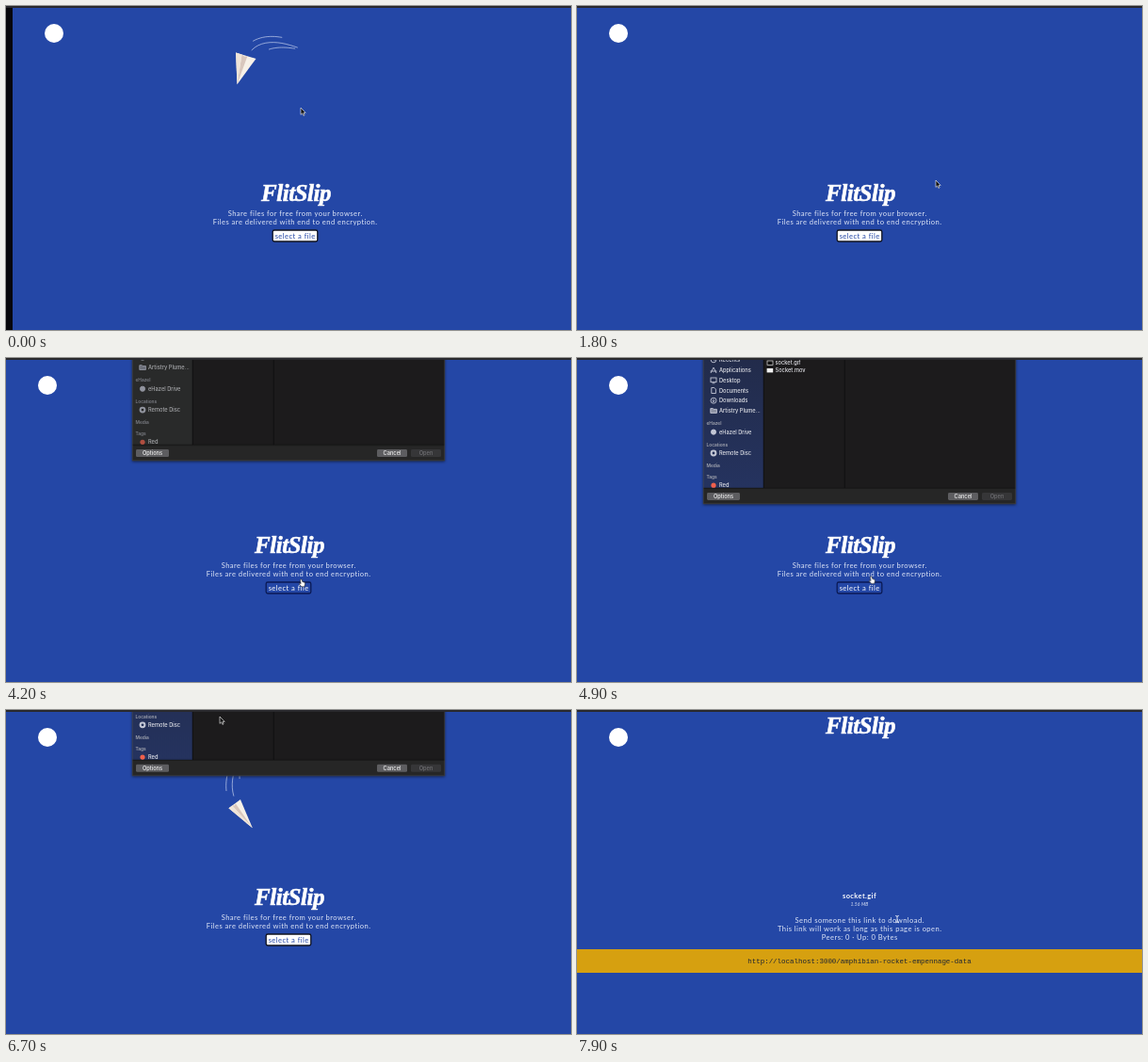
Recreate the animation shown at these times as an HTML page. Size 600 by 344 pixels, loop 8000 ms.

```html
<!DOCTYPE html>
<html lang="en">
<head>
<meta charset="utf-8">
<title>File sharing demo</title>
<style>
  html, body { margin: 0; width: 100%; height: 100%; overflow: hidden; background: #07070b; }
  svg { display: block; width: 600px; height: 344px; }
  text { white-space: pre; }
  .mid { text-anchor: middle; }
  .copy { font: 7.6px Lato, sans-serif; letter-spacing: .44px; fill: #dfe6f7; }
  .brand { font: italic bold 25px "Liberation Serif", serif; letter-spacing: -.5px;
           fill: #fff; stroke: #fff; stroke-width: .6; }
  .link { font: 7.48px "Liberation Mono", monospace; fill: #1d2433; }
  .ui { font: 500 5.7px Inter, sans-serif; fill: #e4e5ea; }
  .head { font: 600 4.8px Inter, sans-serif; fill: #a3a6b0; }
  .icon { fill: none; stroke: #c3c7d6; stroke-width: .9; }
  .trail { fill: none; stroke: #dfe6f8; stroke-width: .6; stroke-linecap: round; }

  #page, .title, .home, .share, .face, .label, #dialog, .tint, #sidebar, #cursor, .arrow, .hand, .beam {
    animation: 8s linear infinite;
  }
  #page { animation-name: settle; }
  @keyframes settle {
    0%, 1.25% { transform: translateX(7px); animation-timing-function: ease-out; }
    4%, 100% { transform: none; }
  }

  .title, .home, .share, .face, .label, .arrow, .hand, .beam { animation-timing-function: step-end; }
  .title { animation-name: lift; }
  .home { animation-name: leave; }
  .share { animation-name: arrive; }
  @keyframes lift { 0% { transform: none; } 92.5%, 100% { transform: translateY(-182px); } }
  @keyframes leave { 0% { opacity: 1; } 92.5%, 100% { opacity: 0; } }
  @keyframes arrive { 0% { opacity: 0; } 92.5%, 100% { opacity: 1; } }

  .face { fill: #fff; stroke: #10131f; stroke-width: 1.3; animation-name: face; }
  .label { fill: #2447a6; animation-name: label; }
  @keyframes face {
    0%, 62.5%, 100% { fill: #fff; stroke: #10131f; }
    35% { fill: #2447a6; stroke: #0b1a55; }
  }
  @keyframes label { 0%, 62.5%, 100% { fill: #2447a6; } 35% { fill: #fff; } }

  #dialog { animation-name: sheet; }
  @keyframes sheet {
    0%, 50% { transform: translateY(-165px); animation-timing-function: cubic-bezier(.33, 1, .68, 1); }
    57.2%, 81.25% { transform: none; animation-timing-function: ease-in; }
    85%, 100% { transform: translateY(-165px); }
  }
  .tint { animation-name: tint; }
  @keyframes tint { 0%, 57.5% { opacity: 0; } 60%, 100% { opacity: 1; } }
  #sidebar { animation-name: wake; }
  @keyframes wake { 0%, 57.5% { opacity: .68; } 60%, 100% { opacity: 1; } }

  #cursor { animation-name: point; }
  @keyframes point {
    0%, 1.25% { transform: translate(313px, 108px); }
    12.5% { transform: translate(318px, 124px); }
    18% { transform: translate(372px, 176px); }
    22.5%, 24% { transform: translate(381px, 185px); animation-timing-function: ease-in-out; }
    33.75% { transform: translate(326px, 221px); }
    37%, 42% { transform: translate(313px, 246px); animation-timing-function: ease-in-out; }
    48%, 60% { transform: translate(312px, 235px); animation-timing-function: ease-in-out; }
    75%, 91% { transform: translate(227px, 7px); animation-timing-function: ease-in-out; }
    98%, 100% { transform: translate(340px, 222px); }
  }
  .arrow { animation-name: arrow; }
  .hand { animation-name: hand; }
  .beam { animation-name: beam; }
  @keyframes arrow { 0%, 62.5% { opacity: 1; } 35%, 96%, 100% { opacity: 0; } }
  @keyframes hand { 0%, 62.5%, 100% { opacity: 0; } 35% { opacity: 1; } }
  @keyframes beam { 0% { opacity: 0; } 96%, 100% { opacity: 1; } }
</style>
</head>
<body>
<svg viewBox="0 0 600 344">
  <defs>
    <linearGradient id="side" x2="0" y2="1">
      <stop offset="0" stop-color="#222b49"/>
      <stop offset="1" stop-color="#25335f"/>
    </linearGradient>
    <filter id="shadow" x="-5%" y="-5%" width="110%" height="115%">
      <feDropShadow dx="0" dy="1" stdDeviation="1.5" flood-color="#000" flood-opacity=".55"/>
    </filter>
  </defs>

  <g id="page">
    <rect width="600" height="344" fill="#2447a6"/>
    <circle cx="44" cy="29" r="10" fill="#fff"/>

    <path id="route" fill="none" d="M400 150 C385 90 330 57 294 44 C275 37 255 38 248 56
      C234 84 241 103 265 127 C295 157 350 165 410 140"/>
    <g id="flight">
      <path class="trail"/><path class="trail"/><path class="trail"/>
      <g id="plane">
        <path d="M16 0 L-16 -10 L-16 10Z" fill="#f7f1e8"/>
        <path d="M16 0 L-16 -1.5 L-14.5 1 L-16 4Z" fill="#d9c7bd"/>
        <path d="M16 0 L-16 4 L-16 10Z" fill="#efe4d8"/>
      </g>
    </g>

    <text class="brand title mid" x="301" y="207">FlitSlip</text>

    <g class="home">
      <text class="copy mid" x="300.2" y="222.5">Share files for free from your browser.</text>
      <text class="copy mid" x="300.2" y="231.7">Files are delivered with end to end encryption.</text>
      <rect class="face" x="276.2" y="238" width="47.6" height="12" rx="1.8"/>
      <text class="copy label mid" x="300.2" y="246.6">select a file</text>
    </g>

    <g class="share">
      <text class="copy mid" x="300" y="200.4" style="font-weight:bold;font-size:7.4px;fill:#fff">socket.gif</text>
      <text class="copy mid" x="300" y="207.6" style="font-style:italic;font-size:5px;letter-spacing:.1px">1.56 MB</text>
      <text class="copy mid" x="300.2" y="225.5">Send someone this link to download.</text>
      <text class="copy mid" x="300.2" y="234.7">This link will work as long as this page is open.</text>
      <text class="copy mid" x="300.2" y="243.8">Peers: 0 · Up: 0 Bytes</text>
      <rect y="254" width="600" height="25" fill="#d6a010"/>
      <text class="link mid" x="300" y="269.2">http://localhost:3000/amphibian-rocket-empennage-data</text>
    </g>
  </g>

  <g id="dialog">
    <rect x="134" y="-10" width="332" height="165" fill="#262627" filter="url(#shadow)"/>
    <rect x="134" y="-10" width="64" height="148" fill="#292a2a"/>
    <rect class="tint" x="134" y="-10" width="64" height="148" fill="url(#side)"/>
    <rect x="198" y="-10" width="268" height="148" fill="#1c1b1c"/>
    <path d="M198.2 -10V138M284.2 -10V138" stroke="#0d0d0e" stroke-width=".8"/>
    <path d="M134 138.2H466" stroke="#111" stroke-width=".7"/>
    <path d="M134.2 -10V154.8H465.8V-10" fill="none" stroke="#4b4c50" stroke-width=".6"/>
    <g id="sidebar"></g>
    <rect x="202" y="3" width="6" height="4.6" fill="#111" stroke="#ddd" stroke-width=".7"/>
    <text class="ui" x="210.5" y="7.4">socket.gif</text>
    <rect x="201.6" y="11" width="6.6" height="4.4" fill="#f3f3f3"/>
    <text class="ui" x="210.5" y="15.3">Socket.mov</text>
    <g id="buttons"></g>
  </g>

  <rect width="600" height="2" fill="#29292d"/>

  <g id="cursor">
    <path class="arrow" d="M0 0V7.4L1.7 5.9L2.9 8.4L4.1 7.8L3 5.4H5.2Z" fill="#111" stroke="#fff" stroke-width=".6"/>
    <path class="hand" d="M1 0Q2 -.4 2.3 .8L2.8 2.6L5 3.2Q5.8 3.6 5.6 5L4.8 7.8H1.8L-.6 4.9Q-.7 3.7 1.2 4.4L.4 1Q.3 .2 1 0Z"
      fill="#fff" stroke="#222" stroke-width=".6"/>
    <path class="beam" d="M-1.8 -3.6Q0 -3.6 0 -2.4Q0 -3.6 1.8 -3.6M0 -2.8V3M-1.8 3.8Q0 3.8 0 2.6Q0 3.8 1.8 3.8"
      fill="none" stroke="#fff" stroke-width=".8"/>
  </g>
</svg>
<script>
const start = performance.now();
const $ = id => document.getElementById(id);

// Sidebar: icons are drawn around (145, 0)
const icons = {
  clock: '<circle cx="145" r="2.8"/><path d="M145 -1.8V0H146.8"/>',
  apps: '<path d="M142 3L145 -3L148 3M141.6 1H148.4"/>',
  desk: '<rect x="142" y="-2.6" width="6" height="4.6"/><path d="M143.5 3.2H146.5"/>',
  doc: '<path d="M142.8 -3H145.8L147.4 -1.4V3H142.8Z"/>',
  down: '<circle cx="145" r="3"/><path d="M145 -1.6V1.4M143.7 .2L145 1.5L146.3 .2"/>',
  folder: '<path d="M141.8 -2.4H144.4L145 -1.6H148.4V2.4H141.8Z" fill="#8d92a3"/>',
  dot: '<circle cx="145" r="2.6" fill="#c3c7d6"/>',
  disc: '<circle cx="145" r="2.4" stroke-width="2"/>',
  red: '<circle cx="145" r="2.6" fill="#f0604c" stroke="none"/>'
};
const rows = [
  [2, 'Recents', 'clock'], [13, 'Applications', 'apps'], [23.6, 'Desktop', 'desk'],
  [34.5, 'Documents', 'doc'], [45.2, 'Downloads', 'down'], [56, 'Artistry Plume...', 'folder'],
  [69.3, 'eHazel'], [78.6, 'eHazel Drive', 'dot'], [92, 'Locations'],
  [101, 'Remote Disc', 'disc'], [114.6, 'Media'], [126.2, 'Tags'], [135.2, 'Red', 'red']
];
$('sidebar').innerHTML = rows.map(([y, label, icon]) => icon
  ? `<g class="icon" transform="translate(0 ${y})">${icons[icon]}</g><text class="ui" x="151" y="${y + 2.1}">${label}</text>`
  : `<text class="head" x="137.5" y="${y + 1.7}">${label}</text>`).join('');

$('buttons').innerHTML = [
  [138, 35, 'Options', '#5d5d60', '#f0f0f0'],
  [394, 32, 'Cancel', '#5d5d60', '#f0f0f0'],
  [430, 32, 'Open', '#363638', '#707074']
].map(([x, w, label, fill, ink]) =>
  `<rect x="${x}" y="143" width="${w}" height="8" rx="1.4" fill="${fill}"/>
   <text class="ui mid" x="${x + w / 2}" y="149.1" style="fill:${ink}">${label}</text>`).join('');

// Plane: one lap of the route, with a pause off stage
const LOOP = 8000, LAP = 3150;
const route = $('route'), trails = document.querySelectorAll('.trail');

// Stops: [lap time, distance along route, wing width, opacity]
const stops = [
  [0, 222, 1.12, 1], [50, 230, 1, 1], [600, 292, .65, 1], [900, 392, .65, 1], [1000, 446, .6, 0],
  [1950, 0, .5, 0], [2150, 38, .6, 1], [LAP, 222, 1.12, 1]
];
// Trails: [near lag, far lag, near side offset, far side offset]
const wakes = [[24, 74, 0, 3], [30, 56, 7, 8], [44, 72, -6, 1]];

function stateAt(time) {
  const i = stops.findIndex(s => s[0] > time);
  const a = stops[i - 1], b = stops[i];
  const f = (time - a[0]) / (b[0] - a[0]);
  return a.map((v, k) => v + (b[k] - v) * f);
}

function pose(s) {
  const p = route.getPointAtLength(s);
  const a = route.getPointAtLength(Math.max(0, s - 2));
  const b = route.getPointAtLength(s + 2);
  return { x: p.x, y: p.y, angle: Math.atan2(b.y - a.y, b.x - a.x) };
}

function wakePath(s, [near, far, side, farSide]) {
  const points = [];
  for (let i = 0; i <= 12; i++) {
    const f = i / 12, p = pose(Math.max(0, s - near - (far - near) * f));
    const d = side + (farSide - side) * f;
    points.push(`${(p.x - Math.sin(p.angle) * d).toFixed(2)} ${(p.y + Math.cos(p.angle) * d).toFixed(2)}`);
  }
  return 'M' + points.join('L');
}

function draw() {
  const time = Math.max(0, performance.now() - start) % LOOP % LAP;
  const [, s, width, opacity] = stateAt(time);
  $('flight').style.opacity = opacity;
  if (opacity > 0) {
    const p = pose(s);
    $('plane').setAttribute('transform',
      `translate(${p.x} ${p.y}) rotate(${p.angle * 180 / Math.PI}) scale(1 ${width})`);
    trails.forEach((t, i) => t.setAttribute('d', wakePath(s, wakes[i])));
  }
  requestAnimationFrame(draw);
}
draw();
</script>
</body>
</html>
```
